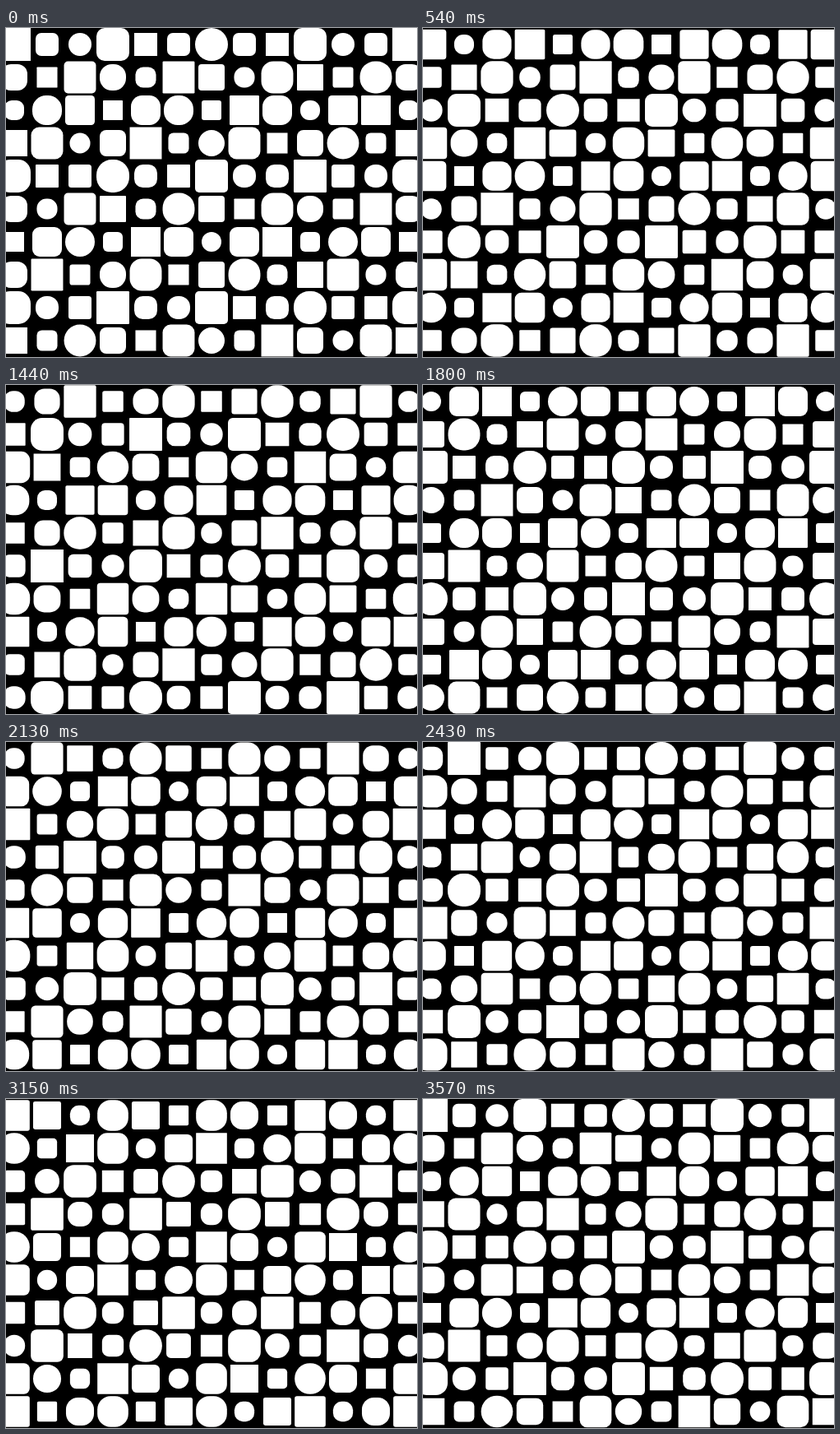
Animation of 500 by 400 pixels, one loop 3.6 s. Source, as an HTML page without scripts:

```html
<!DOCTYPE html>
<html lang="en">
<head>
<meta charset="utf-8">
<title>Breathing tiles</title>
<style>
  @property --turn {
    syntax: "<angle>";
    inherits: true;
    initial-value: 0deg;
  }
  @keyframes cycle { to { --turn: 360deg; } }

  html, body { margin: 0; width: 100%; height: 100%; overflow: hidden; background: #000; }
  svg {
    display: block;
    width: 500px;
    height: 400px;
    animation: cycle 3.6s steps(120) -1ms infinite;
  }

  /* Size and roundness are two waves crossing the grid at right angles. */
  rect {
    --size: calc(32px + 8px * cos(var(--turn) + 120deg * var(--c) + 90deg * var(--r)));
    --round: calc(0.25 - 0.25 * cos(var(--turn) + 90deg * var(--c) - 120deg * var(--r)));
    x: calc(10px + 40px * var(--c) - var(--size) / 2);
    y: calc(20px - var(--size) / 2);
    width: var(--size);
    height: var(--size);
    rx: calc(var(--size) * var(--round));
    ry: calc(var(--size) * var(--round));
    fill: #fff;
  }
</style>
</head>
<body>
<svg viewBox="0 0 500 400">
  <defs>
    <g id="row">
      <rect style="--c:0"/><rect style="--c:1"/><rect style="--c:2"/><rect style="--c:3"/>
      <rect style="--c:4"/><rect style="--c:5"/><rect style="--c:6"/><rect style="--c:7"/>
      <rect style="--c:8"/><rect style="--c:9"/><rect style="--c:10"/><rect style="--c:11"/>
      <rect style="--c:12"/>
    </g>
  </defs>
  <use href="#row" style="--r:0"/>
  <use href="#row" y="40" style="--r:1"/>
  <use href="#row" y="80" style="--r:2"/>
  <use href="#row" y="120" style="--r:3"/>
  <use href="#row" y="160" style="--r:4"/>
  <use href="#row" y="200" style="--r:5"/>
  <use href="#row" y="240" style="--r:6"/>
  <use href="#row" y="280" style="--r:7"/>
  <use href="#row" y="320" style="--r:8"/>
  <use href="#row" y="360" style="--r:9"/>
</svg>
</body>
</html>
```
